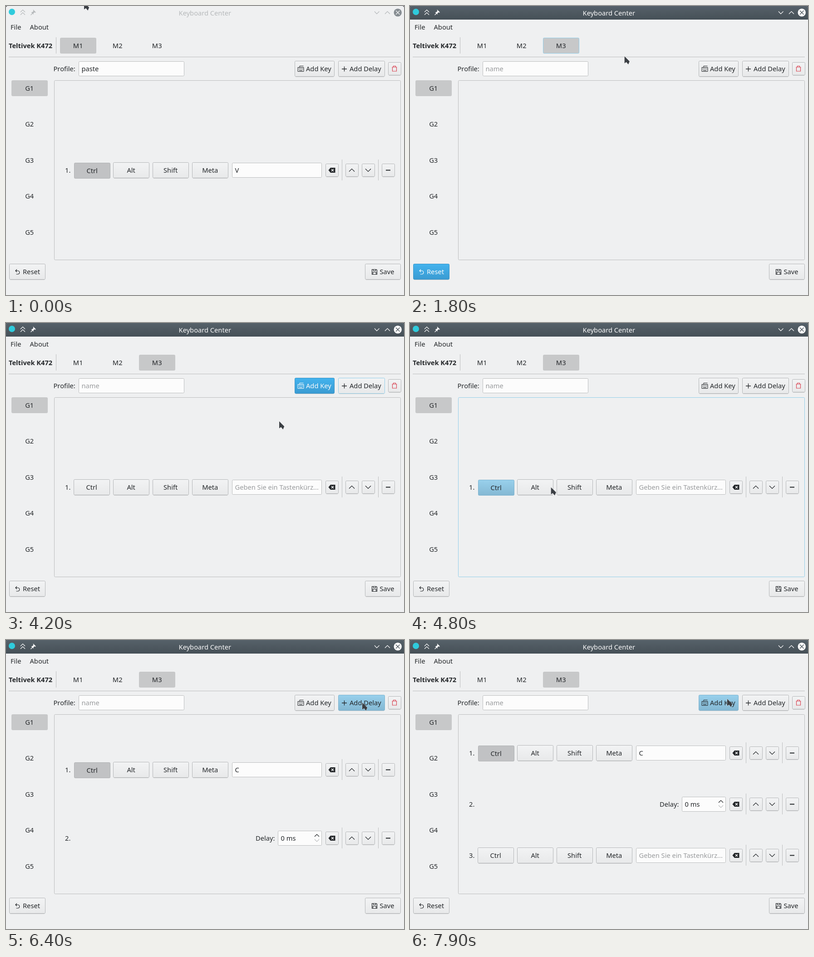
Write an HTML page that moves like this. It is 877 px wide and 638 px high and loops after 8 s.

```html
<!DOCTYPE html>
<html lang="en">
<head>
<meta charset="utf-8">
<title>Keyboard Center</title>
<style>
  html, body { margin: 0; width: 100%; height: 100%; overflow: hidden; background: #eff0f1; }
  svg { display: block; width: 100vw; height: 100vh; }
  text { font: 14.667px "Noto Sans", sans-serif; white-space: pre; }
  .bold { font-weight: 700; }
</style>
</head>
<body>
<svg viewBox="0 0 877 638">
  <defs>
    <linearGradient id="bar" x2="0" y2="1"><stop stop-color="#566169"/><stop offset="1" stop-color="#465057"/></linearGradient>
    <linearGradient id="plain" x2="0" y2="1"><stop stop-color="#f2f3f4"/><stop offset="1" stop-color="#e8e9ea"/></linearGradient>
    <linearGradient id="focus" x2="0" y2="1"><stop stop-color="#43b3ee"/><stop offset="1" stop-color="#3a9bd2"/></linearGradient>
    <linearGradient id="press" x2="0" y2="1"><stop stop-color="#98d0ec"/><stop offset="1" stop-color="#84b8d3"/></linearGradient>
  </defs>
  <g id="scene"></g>
</svg>
<script>
const LOOP = 8000, STEP = 100;
const INK = '#232629', LINE = '#bcbebf', HOVER = '#93cee9', FOCUS = '#3daee9', FADED = '#999b9d';

// Pointer path: time, x, y
const POINTER = [
  [0, 172, -8], [400, 390, 21], [700, 390, 21], [900, 382, 60], [1100, 338, 86],
  [1700, 338, 86], [2000, 742, 161], [2200, 687, 143], [3200, 687, 143], [3500, 748, 141],
  [4100, 748, 141], [4200, 602, 217], [4500, 186, 362], [4700, 186, 362], [5000, 560, 364],
  [5300, 560, 364], [5500, 637, 269], [6000, 785, 138], [6700, 785, 138], [7100, 720, 300],
  [7600, 699, 130], [8000, 699, 130]
];

// Button looks: fill, border, ink, offset
const LOOKS = {
  plain: ['url(#plain)', '#b5b7b9', INK, 0],
  focus: ['url(#focus)', '#3a94c6', '#fcfcfc', 0],
  blur: [FOCUS, '#3a9bd0', INK, 0],
  press: ['url(#press)', '#7fb4cf', INK, 0],
  down: ['url(#press)', '#7fb4cf', INK, 1],
  checked: ['#c1c2c4', '#b0b2b4', INK, 1]
};

let time = 0, hot = [0, 0];
const between = (from, to) => time >= from && time < to;

function pointerAt(t) {
  const i = Math.max(1, POINTER.findIndex(key => key[0] >= t));
  const [t0, x0, y0] = POINTER[i - 1], [t1, x1, y1] = POINTER[i];
  const k = Math.max(0, (t - t0) / (t1 - t0));
  return [x0 + (x1 - x0) * k, y0 + (y1 - y0) * k];
}

const isHot = (x, y, w, h) => hot[0] >= x && hot[0] < x + w && hot[1] >= y && hot[1] < y + h;
const text = (x, y, label, fill = INK, extra = '') => `<text x="${x}" y="${y}" fill="${fill}" ${extra}>${label}</text>`;
const centred = (x, y, label, fill) => text(x, y, label, fill, 'text-anchor="middle"');
const path = (d, stroke = INK, extra = '') => `<path d="${d}" fill="none" stroke="${stroke}" ${extra}/>`;
const rect = (x, y, w, h, fill, stroke) =>
  `<rect x="${x + .5}" y="${y + .5}" width="${w - 1}" height="${h - 1}" rx="2" fill="${fill}" stroke="${stroke}"/>`;
const move = (x, y, markup) => `<g transform="translate(${x} ${y})">${markup}</g>`;

// Icons are drawn around their centre
const ICONS = {
  keyboard: c => path('M-6.5 -3.5H6.5V5.5H-6.5ZM-3.5 3.5H3.5M-2.5 -4V-6.5H6', c) +
    path('M-4.5 -1.5H5M-4.5 1H5', c, 'stroke-dasharray="1.5 1.2"'),
  plus: c => path('M-5.5 0H5.5M0 -5.5V5.5', c, 'stroke-width="1.3"'),
  trash: () => path('M-5.5 -3.5H5.5M-2.5 -4V-6H2.5V-4M-4.5 -3.5V5.5H4.5V-3.5', '#da4453', 'stroke-width="1.2"'),
  undo: c => path('M-1.5 -5.5L-4.5 -2.5L-1.5 .5M-4.5 -2.5H1A3.8 3.8 0 0 1 1 5H-3', c, 'stroke-width="1.2"'),
  disk: c => path('M-5.5 -5.5H4L5.5 -4V5.5H-5.5ZM-3.5 5.5V.5H3.5V5.5M-2.5 -5V-2.5H2.5V-5', c, 'stroke-width="1.2"'),
  erase: c => `<path d="M-7.5 0L-3 -5.5H7.5V5.5H-3Z" fill="${c}"/>` + path('M-1 -2.5L4 2.5M4 -2.5L-1 2.5', '#f2f3f4', 'stroke-width="1.6"'),
  up: c => path('M-6 3L0 -3L6 3', c, 'stroke-width="1.2"'),
  down: c => path('M-6 -3L0 3L6 -3', c, 'stroke-width="1.2"'),
  minus: c => path('M-5 0H5', c, 'stroke-width="2"')
};

function button(x, y, w, h, content, look = 'plain') {
  const [fill, border, ink, shift] = LOOKS[look];
  const edge = look === 'plain' && isHot(x, y, w, h) ? HOVER : border;
  const shadow = shift ? '' : path(`M${x + 2} ${y + h + .5}H${x + w - 2}`, '#000', 'opacity=".13"');
  return shadow + move(shift, shift, rect(x, y, w, h, fill, edge) + content(ink));
}

const iconButton = (x, y, icon) => button(x, y, 29, 29, ink => move(x + 14, y + 14.5, ICONS[icon](ink)));
const labelButton = (x, y, w, icon, iconX, labelX, label, look) => button(x, y, w, 35,
  ink => move(iconX, y + 18, ICONS[icon](ink)) + text(labelX, y + 23, label, ink), look);

function tab(x, y, label, selected) {
  const edge = isHot(x, y, 80, 35) ? HOVER : 'none';
  const back = selected ? rect(x, y, 80, 35, '#c7c8c9', edge === 'none' ? '#c7c8c9' : edge) : rect(x, y, 80, 35, 'none', edge);
  return back + centred(x + 39.7, y + 23, label);
}

function field(x, y, w, value, hint, focused) {
  const edge = focused ? FOCUS : isHot(x, y, w, 33) ? HOVER : LINE;
  return rect(x, y, w, 33, '#fcfcfc', edge) + text(x + 6.5, y + 22, value || hint, value ? INK : FADED);
}

function titleBar() {
  const active = time < 500 ? 0 : time < 600 ? .5 : 1;
  const paint = (ink, disc, cross) =>
    path('M32 13.5L37 8.5L42 13.5M32 19.5L37 14.5L42 19.5M812 12L817 17.5L822.5 12M835 17.5L840.5 12L846 17.5', ink, 'stroke-width="1.2"') +
    `<path d="M60 8L66 14L64.5 14.8L62.5 14L60.5 16L60.5 19L55.5 14L58 13.5L60.5 11.2L59.6 9Z" fill="${ink}"/>` +
    path('M54.5 20L58.5 16', ink, 'stroke-width="1.3"') +
    `<circle cx="863.3" cy="14.5" r="8.7" fill="${disc}"/>` +
    path('M859 10.2L867.6 18.8M867.6 10.2L859 18.8', cross, 'stroke-width="1.3"') +
    centred(438.3, 20.5, 'Keyboard Center', ink);
  const shape = 'M0 30V4Q0 0 4 0H873Q877 0 877 4V30Z';
  return '<path d="M0 0H877V5H0Z" fill="#25292c"/>' + `<path d="${shape}" fill="#eff0f1"/>` +
    paint('#b6b9bb', '#868d92', '#eff0f1') +
    `<g opacity="${active}"><path d="${shape}" fill="url(#bar)"/>${paint('#fcfcfc', '#fcfcfc', '#4b555c')}</g>` +
    '<circle cx="13" cy="13" r="7" fill="#2fcbdc"/>';
}

function rowTools(y) {
  return iconButton(704, y - 14, 'erase') + iconButton(748, y - 14, 'up') +
    iconButton(784, y - 14, 'down') + iconButton(828, y - 14, 'minus') +
    path(`M740.5 ${y - 23}V${y + 23}M820.5 ${y - 23}V${y + 23}`, LINE);
}

function keyRow(y, number, { ctrl = 'plain', value = '', focused = false }) {
  const keys = ['Ctrl', 'Alt', 'Shift', 'Meta'].map((label, i) => {
    const x = 149 + i * 87;
    return button(x, y - 17, 80, 35, ink => centred(x + 39.7, y + 6, label, ink), i ? 'plain' : ctrl);
  });
  return text(130, y + 6, number + '.') + keys.join('') +
    field(498, y - 16, 198, value, 'Geben Sie ein Tastenkürz...', focused) + rowTools(y);
}

function delayRow(y, number) {
  return text(130, y + 6, number + '.') + text(550, y + 6, 'Delay:') + field(599, y - 16, 97, '0 ms') +
    path(`M680 ${y - 3}L685 ${y - 8}L690 ${y - 3}`, INK, 'stroke-width="1.2"') +
    path(`M680 ${y + 3}L685 ${y + 8}L690 ${y + 3}`, LINE, 'stroke-width="1.2"') + rowTools(y);
}

function rows() {
  if (time < 1400) return keyRow(362, 1, { ctrl: 'checked', value: 'V' });
  if (time < 3200) return '';
  const first = {
    ctrl: time < 4600 ? 'plain' : time < 5200 ? 'down' : 'checked',
    value: time < 5400 ? '' : time < 6300 ? 'C, ...' : 'C',
    focused: between(5200, 6300)
  };
  if (time < 6400) return keyRow(362, 1, first);
  if (time < 7900) return keyRow(286, 1, first) + delayRow(437, 2);
  return keyRow(249, 1, first) + delayRow(362, 2) + keyRow(475, 3, {});
}

// A click presses for one step, fades for one, then holds focus
const clicked = (start, end) => !between(start, end) ? 'plain' :
  time < start + 100 ? 'down' : time < start + 200 ? 'press' : 'focus';

function toolbar() {
  const selected = time < 1400 ? 1 : 3;
  const addKey = time < 7000 ? clicked(3100, 4600) : clicked(7800, LOOP);
  return text(10, 52, 'File') + text(52.5, 52, 'About') + text(6, 93, 'Teltivek K472', INK, 'class="bold"') +
    path('M110.5 69V105M6 112.5H870', LINE) +
    [1, 2, 3].map(n => tab(119 + (n - 1) * 87, 70, 'M' + n, n === selected || (n === 3 && time === 1300))).join('') +
    text(104.5, 144, 'Profile:') + field(160, 122, 233, selected === 1 ? 'paste' : '', 'name') +
    labelButton(636, 121, 88, 'keyboard', 649.5, 661, 'Add Key', addKey) +
    labelButton(732, 121, 103, 'plus', 745.5, 757, 'Add Delay', clicked(6300, 7800)) +
    iconButton(842, 124, 'trash');
}

function scene() {
  const reset = between(600, 3100) ? 'focus' : between(3100, 3200) ? 'blur' : 'plain';
  const [x, y] = pointerAt(time);
  return titleBar() + toolbar() +
    [1, 2, 3, 4, 5].map(n => tab(12, Math.round(164 + (n - 1) * 79.4), 'G' + n, n === 1)).join('') +
    rect(106, 164, 764, 397, 'none', isHot(106, 164, 764, 397) ? HOVER : LINE) + rows() +
    labelButton(7, 569, 80, 'undo', 25.5, 37, 'Reset', reset) +
    labelButton(791, 569, 79, 'disk', 812, 823.5, 'Save') +
    move(x, y, '<path d="M0 0V15.5L4 12.8L8.3 18L11.2 11.2Z" fill="#3b3f44" stroke="#fcfcfc" stroke-opacity=".8" paint-order="stroke"/>');
}

const stage = document.getElementById('scene');
const started = performance.now();
let shown = -1;

function draw() {
  time = Math.floor((performance.now() - started) % LOOP / STEP) * STEP;
  if (time !== shown) {
    shown = time;
    hot = pointerAt(Math.max(0, time - 100)); // hover trails the pointer
    stage.innerHTML = scene();
  }
  requestAnimationFrame(draw);
}
draw();
</script>
</body>
</html>
```
